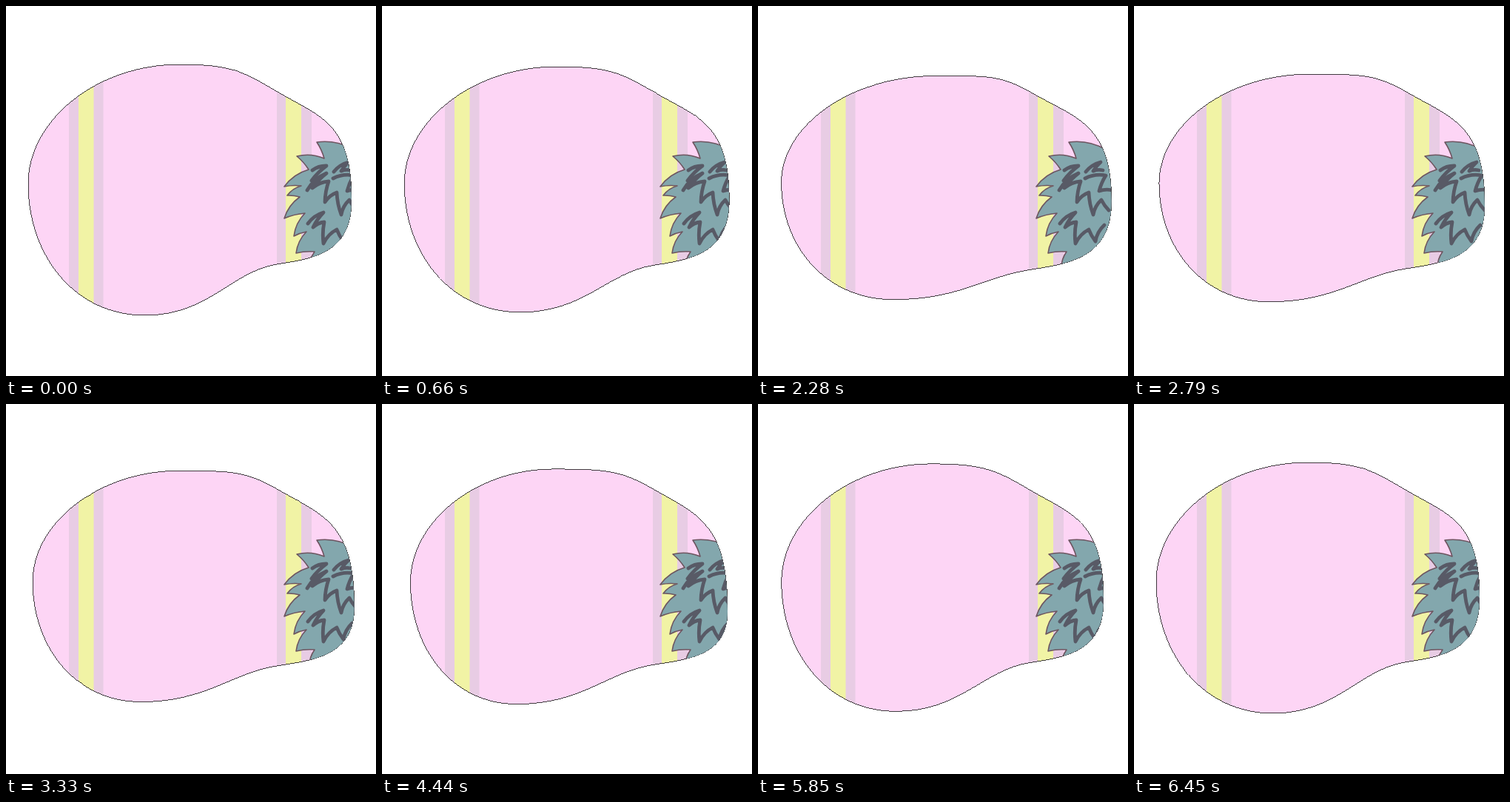
Animation of 500 by 500 pixels, one loop 6.51 s. Source, as an HTML page:

```html
<!DOCTYPE html>
<html lang="en">
<head>
<meta charset="utf-8">
<title>Blob window</title>
<style>
  html, body { margin: 0; width: 100%; height: 100%; overflow: hidden; background: #fff; }
  svg { display: block; width: 100vw; height: 100vh; }
</style>
</head>
<body>
<svg viewBox="0 0 500 500">
  <defs>
    <clipPath id="window"><path class="blob"/></clipPath>
  </defs>
  <g clip-path="url(#window)">
    <rect width="500" height="500" fill="#fdd5f5"/>
    <g fill="#e8cce4">
      <rect x="85" width="46.5" height="500"/>
      <rect x="366" width="47" height="500"/>
    </g>
    <g fill="#f1f3a5">
      <rect x="98" width="20.5" height="500"/>
      <rect x="378" width="21" height="500"/>
    </g>
  </g>
  <path class="blob" fill="none" stroke="#000" stroke-width=".75" shape-rendering="crispEdges"/>
  <g clip-path="url(#window)" stroke-linejoin="round" stroke-linecap="round">
    <path id="fur" fill="#83a7ad" stroke="#6d5560" stroke-width="1.6"/>
    <path id="scribbles" fill="none" stroke="#585a66" stroke-width="4.8"/>
  </g>
</svg>
<script>
const LOOP = 6510, STEP = 30;

// Outline anchors clockwise: heading in degrees, handle reach before and
// after the anchor, and its position in each of the three poses.
const anchors = [
  { heading: 0,   reach: [.55, .55], spots: [[235, 79], [240, 95], [232, 88]] },
  { heading: 30,  reach: [.4, .4],   spots: [[372, 119], [372, 118.5], [372, 118]] },
  { heading: 90,  reach: [.72, .83], spots: [[467, 262], [478.5, 262], [467, 280]] },
  { heading: 171, reach: [.45, .33], spots: [[366, 349], [366, 357], [366, 352.5]] },
  { heading: 180, reach: [.48, .6],  spots: [[188, 418], [183, 396], [182, 405.5]] },
  { heading: 270, reach: [.55, .53], spots: [[30, 240], [31, 238], [38.5, 241]] }
];

const easings = [
  x => x ** 1.4,
  x => 1 - (1 - x) ** 1.5,
  x => (1 - Math.cos(Math.PI * x)) / 2
];

// Each handle follows its heading, scaled by the chord's extent that way.
function handle(anchor, point, chord, side) {
  const angle = anchor.heading * Math.PI / 180;
  const dx = Math.cos(angle), dy = Math.sin(angle);
  const length = anchor.reach[side] * (chord[0] * dx + chord[1] * dy);
  const sign = side ? 1 : -1;
  return [point[0] + sign * length * dx, point[1] + sign * length * dy];
}

function blobPath(time) {
  const phase = time / LOOP * easings.length;
  const pose = Math.floor(phase), next = (pose + 1) % easings.length;
  const mix = easings[pose](phase - pose);
  const points = anchors.map(({ spots }) =>
    spots[pose].map((v, axis) => v + (spots[next][axis] - v) * mix));
  return anchors.reduce((path, anchor, i) => {
    const j = (i + 1) % anchors.length;
    const chord = points[j].map((v, axis) => v - points[i][axis]);
    const out = handle(anchor, points[i], chord, 1);
    const into = handle(anchors[j], points[j], chord, 0);
    return `${path}C${out} ${into} ${points[j]}`;
  }, `M${points[0]}`) + "Z";
}

// A zigzag whose edges bend sideways by two alternating amounts.
function bowed(corners, ...bends) {
  const points = corners.split(" ").map(pair => pair.split(",").map(Number));
  return points.slice(1).reduce((path, [x, y], i) => {
    const [px, py] = points[i], bend = bends[i % 2];
    const cx = (px + x) / 2 - (y - py) * bend;
    const cy = (py + y) / 2 + (x - px) * bend;
    return `${path}Q${cx} ${cy} ${x} ${y}`;
  }, `M${points[0]}`);
}

document.getElementById("fur").setAttribute("d", bowed(
  "470,194 420,184 430,206 393,203 409,221 376,244 399,243 380,256 " +
  "397,258 376,287 404,280 389,311 406,305 392,334 417,332 410,355", .17, -.08
) + "L500 360V205Z");

document.getElementById("scribbles").setAttribute("d", [
  "414,222 433,216 413,236",
  "407,249 433,226 414,246 436,237 431,265 447,252 453,282 464,262 474,276",
  "408,294 429,279 415,299 430,292 429,321 447,302 456,318 468,296",
  "443,224 463,211 453,223 466,222",
  "442,233 470,229 461,250 482,250"
].map(corners => bowed(corners, -.17, .08)).join(""));

const blobs = document.querySelectorAll(".blob");

function draw(time) {
  const d = blobPath(Math.floor(time % LOOP / STEP) * STEP);
  blobs.forEach(blob => blob.setAttribute("d", d));
}

const start = performance.now();
function tick() {
  draw(performance.now() - start);
  requestAnimationFrame(tick);
}
tick();
</script>
</body>
</html>
```
